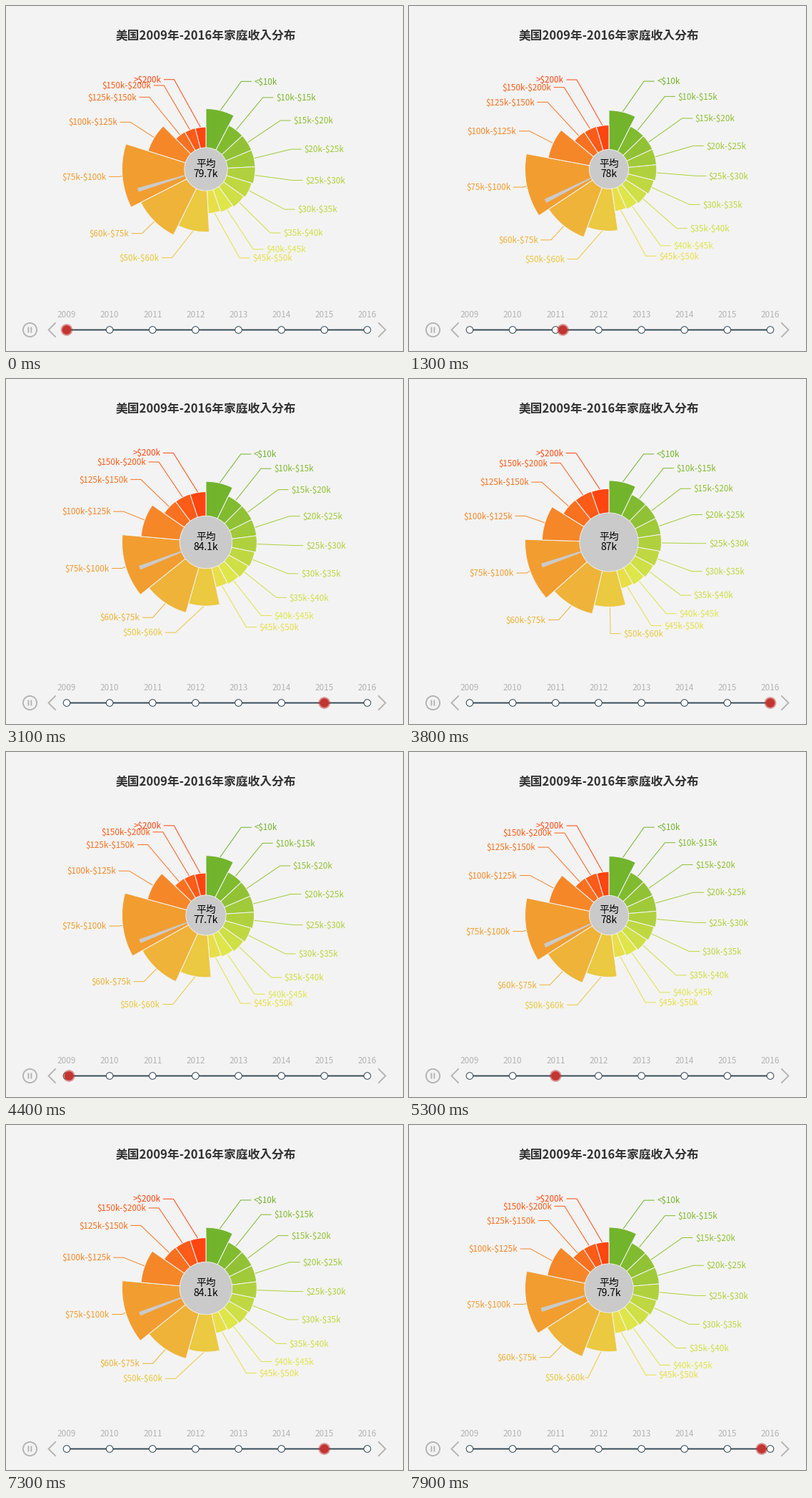
Animation of 556x482 px, one loop 8000 ms. Source, as a matplotlib script:

```python
import numpy as np
import matplotlib.pyplot as plt
from matplotlib.animation import FuncAnimation
from matplotlib.patches import Circle, Polygon

W, H, DPI = 556, 482, 64
PT = 72 / DPI
CX, CY, R_MAX, R_ELBOW, R_TEXT = 280, 228, 117.5, 126.3, 140
FRAMES, STEP = 80, 100
MOVE = 300  # ms for one year change

BOUNDS = [*range(10, 55, 5), 60, 75, 100, 125, 150, 200]
NAMES = (["<$10k"] + [f"${a}k-${b}k" for a, b in zip(BOUNDS, BOUNDS[1:])]
         + [">$200k"])
N = len(NAMES)
YEARS = range(2009, 2017)
MEANS = [79.7, 77.7, 78, 78, 79.7, 80.4, 84.1, 87]

# Slice widths in degrees at a few slices, for the first and last year
KNOTS = [0, 1, 4, 8, 9, 10, 11, 12, 13, 15]
FIRST = [27.5, 19.8, 19.7, 16.1, 29.2, 36.6, 44.2, 27.7, 15.1, 14.6]
LAST = [25.7, 18.7, 18.5, 14.9, 28.2, 35.2, 43.6, 30, 19.6, 19.2]

# Start time of every year change, in ms
STARTS = np.interp(np.arange(18), [0, 8, 13, 17], [-397, 3806, 6295, 8322])

BG, GREY, MUTED, NAVY, RED = "#f3f3f3", "#cacaca", "#b4b4b4", "#304654", "#c23531"


def ramp(i):
    stops = np.array([(114, 180, 44), (230, 234, 76), (255, 69, 16)]) / 255
    return [np.interp(i, [0, 7.5, 15], stops[:, c]) for c in range(3)]


COLORS = [ramp(i) for i in range(N)]


def polar(r, deg):
    """Point at clockwise angle from the top."""
    a = np.radians(deg)
    return np.stack([CX + r * np.sin(a), CY - r * np.cos(a)], axis=-1)


def sector(r0, r1, a, b):
    arc = np.linspace(a, b, 40)
    return np.concatenate([polar(r1, arc), polar(r0, arc[::-1])])


def widths(year):
    """Incomes drift upwards, slowest in the middle years."""
    t = (year - YEARS[0]) / (len(YEARS) - 1)
    mix = t + 0.08 * np.sin(2 * np.pi * t)
    knots = (1 - mix) * np.array(FIRST) + mix * np.array(LAST)
    share = np.interp(np.arange(N), KNOTS, knots)
    return share * 360 / share.sum()


def layout(year, mean):
    share = widths(year)
    edges = np.concatenate([[0], np.cumsum(share)])
    r0 = 27.5 + 1.5 * (mean - 78)
    radii = r0 + (R_MAX - r0) * share / share.max()
    mids = (edges[1:] + edges[:-1]) / 2
    side = np.where(mids < 180, 1, -1)
    elbow = polar(R_ELBOW, mids)
    ty = elbow[:, 1].copy()
    for i in range(1, N):
        if side[i] > 0 and mids[i] > 90:
            ty[i] = max(ty[i], ty[i - 1] + 11)
    # Labels sit on a ring unless pushed below it
    dy = np.abs(ty - CY)
    ring = CX + side * np.sqrt(np.maximum(R_TEXT ** 2 - dy ** 2, 0))
    tx = np.where(dy < R_ELBOW, ring, elbow[:, 0] + side * 18)
    lines = np.stack([polar(radii, mids),
                      np.stack([tx - 18 * side, ty], -1),
                      np.stack([tx - 4 * side, ty], -1)], axis=1)
    k = BOUNDS.index(75) + 1
    needle = edges[k] + (mean - 75) / 25 * share[k]
    return [edges, radii, r0, needle, np.stack([tx, ty], -1), lines], side


LAYOUTS = [layout(y, m) for y, m in zip(YEARS, MEANS)]


def cubic_out(k):
    return 1 - (1 - k) ** 3


def quintic_in_out(k):
    return 16 * k ** 5 if k < 0.5 else 1 - 16 * (1 - k) ** 5


plt.rcParams["font.family"] = ["Noto Sans CJK JP", "DejaVu Sans"]
plt.rcParams["text.parse_math"] = False
plt.rcParams["toolbar"] = "None"
fig = plt.figure(figsize=(W / DPI, H / DPI), dpi=DPI, facecolor=BG)
ax = fig.add_axes([0, 0, 1, 1])
ax.set(xlim=(0, W), ylim=(H, 0))
ax.axis("off")


def text(x, y, s, size, color, ha="center", **kw):
    return ax.text(x, y + 0.365 * size, s, fontsize=size * PT, color=color,
                   ha=ha, va="baseline", **kw)


def stroke(xs, ys, color, width, **kw):
    return ax.plot(xs, ys, color=color, lw=width * PT, snap=False, **kw)[0]


def shape(patch):
    patch.set_snap(False)
    return ax.add_patch(patch)


def year_x(i):
    return 85 + i * 60.14


# Static parts: title, timeline and its controls
text(CX, 41.6, "美国2009年-2016年家庭收入分布", 16.7, "#333333", weight="bold")

BAR_Y = 452.5
stroke([year_x(0), year_x(7)], [BAR_Y, BAR_Y], NAVY, 1.9, zorder=2)
for i, y in enumerate(YEARS):
    shape(Circle((year_x(i), BAR_Y), 4.8, fc="white", ec=NAVY, lw=PT, zorder=3))
    text(year_x(i), 431, str(y), 11.7, MUTED)
shape(Circle((33.5, BAR_Y), 9.6, fc="none", ec=MUTED, lw=1.9 * PT))
for x in (31.4, 35.4):
    stroke([x, x], [448.5, 456.5], MUTED, 1.9, solid_capstyle="butt")
for base, tip in ((69, 59.5), (522, 531.5)):
    stroke([base, tip, base], [443, BAR_Y, 462], MUTED, 1.9,
           solid_joinstyle="miter")

# Moving parts
slices = [shape(Polygon([(0, 0)] * 3, fc=c, ec=BG, lw=PT, zorder=2))
          for c in COLORS]
needle = shape(Polygon([(0, 0)] * 3, fc=GREY, ec="none", zorder=3))
hub = shape(Circle((CX, CY), 30, fc=GREY, ec="none", zorder=3))
leaders = [stroke([], [], c, 1, zorder=1) for c in COLORS]
labels = [text(0, 0, s, 11.6, c) for s, c in zip(NAMES, COLORS)]
text(CX, 220, "平均", 13.8, "black", zorder=4)
mean_text = text(CX, 233.5, "", 14, "black", zorder=4)
halo = shape(Circle((0, BAR_Y), 8.3, fc=RED, ec="none", alpha=0.5, zorder=4))
dot = shape(Circle((0, BAR_Y), 6.3, fc=RED, ec="none", zorder=5))


def draw(frame):
    t = frame * STEP
    step = np.searchsorted(STARTS, t, side="right") - 1
    k = min((t - STARTS[step]) / MOVE, 1)
    now, before = step % 8, (step - 1) % 8
    (new, side), (old, _) = LAYOUTS[now], LAYOUTS[before]
    e = cubic_out(k)
    edges, radii, r0, angle, spots, lines = [
        a + (b - a) * e for a, b in zip(old, new)]

    for i in range(N):
        slices[i].set_xy(sector(r0, radii[i], edges[i], edges[i + 1]))
        leaders[i].set_data(lines[i].T)
        labels[i].set_position((spots[i, 0], spots[i, 1] + 4.2))
        labels[i].set_ha("left" if side[i] > 0 else "right")
    needle.set_xy(sector(r0, 99.5, angle, angle + 3.3))
    hub.set_radius(r0 - 0.3)
    mean_text.set_text(f"{MEANS[now]:g}k")

    a, b = year_x(before), year_x(now)
    halo.center = dot.center = (a + (b - a) * quintic_in_out(k), BAR_Y)
    return []


anim = FuncAnimation(fig, draw, frames=FRAMES, interval=STEP,
                     repeat=True, repeat_delay=0, blit=False)
plt.show()
```
